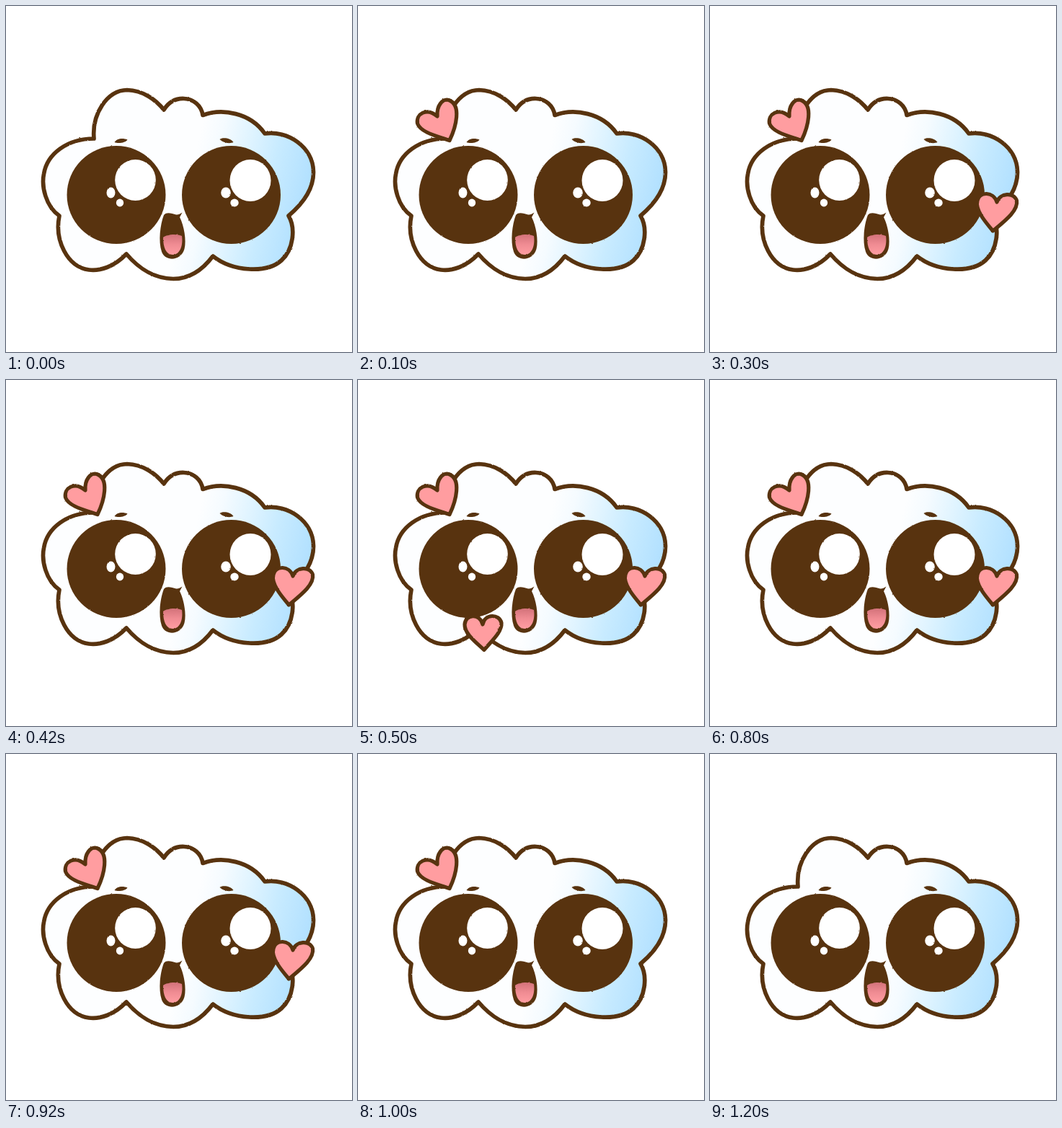
An HTML page that plays this animation: 480 px wide and 480 px high, repeating every 1300 ms.

```html
<!DOCTYPE html>
<html lang="en">
<head>
<meta charset="utf-8">
<title>Cloud with hearts</title>
<style>
  html, body { margin: 0; width: 100%; height: 100%; overflow: hidden; background: #fff; }
  svg { display: block; width: 100vw; height: 100vh; }
  .line { stroke: #58330f; stroke-width: 5.7; stroke-linejoin: round; stroke-linecap: round; }
  .ink { fill: #58330f; }
  .shine { fill: #fff; }
  .heart { fill: #ff9da0; stroke-width: 5.2; visibility: hidden; animation: 1300ms step-end infinite; }
  .one { animation-name: one; }
  .two { animation-name: two; }
  .three { animation-name: three; }
  /* Hearts pop in one by one, then leave in reverse order */
  @keyframes one {
    0%, 92.307% { visibility: hidden; }
    7.692% { visibility: visible; }
  }
  @keyframes two {
    0%, 76.923% { visibility: hidden; }
    23.076% { visibility: visible; }
  }
  @keyframes three {
    0%, 61.538% { visibility: hidden; }
    38.461% { visibility: visible; }
  }
</style>
</head>
<body>
<svg viewBox="0 0 480 480">
  <defs>
    <linearGradient id="sky" gradientUnits="userSpaceOnUse" x1="258" y1="225" x2="415" y2="262">
      <stop offset="0" stop-color="#fdfeff"/>
      <stop offset=".18" stop-color="#f5fbff"/>
      <stop offset=".42" stop-color="#e0f4ff"/>
      <stop offset=".68" stop-color="#c8ebff"/>
      <stop offset="1" stop-color="#b3e1ff"/>
    </linearGradient>
    <linearGradient id="tongue" x1="0" y1="0" x2="0" y2="1">
      <stop offset="0" stop-color="#d3727a"/>
      <stop offset=".5" stop-color="#f08c93"/>
      <stop offset="1" stop-color="#ff9da2"/>
    </linearGradient>
    <filter id="brush" filterUnits="userSpaceOnUse" x="0" y="0" width="480" height="480" color-interpolation-filters="sRGB">
      <feTurbulence type="fractalNoise" baseFrequency=".25" numOctaves="2" seed="4"/>
      <feDisplacementMap in="SourceGraphic" scale="1.8" xChannelSelector="R" yChannelSelector="G"/>
    </filter>
  </defs>

  <g filter="url(#brush)">
    <path class="line" fill="url(#sky)" d="M122 184C119 150 140 117 168 116.500C190 117 208 130 219 144
      C226 133 236 128 247 128.500C260 129 271 138 273 151.500C300 141.500 339 148 359 177
      C390 172 426 195 426.500 230C427 255 411 275 392 291C402 308 399 338 382 353
      C362 371 315 369 287 347C272 367 255 378.500 232 378.500C205 378 185 365 167 344
      C150 362 130 368 115 366C85 362 67 325 74 291C55 278 49 250 52.500 233
      C57 205 85 184 122 184Z"/>

    <g class="ink">
      <path d="M150.500 189C153 184 162 182.500 168.500 185.500C166 189.500 156 191.500 150.500 189Z"/>
      <path d="M296.500 185C300 181.500 312 183 315.500 189C310 191.500 301 190 296.500 185Z"/>
      <ellipse cx="153" cy="262" rx="68.500" ry="68"/>
      <ellipse cx="312.500" cy="262" rx="68.500" ry="68"/>
      <path d="M219 290C223 285 230 288 236 289.500C239 290 241 288.500 244.500 286.500L241 293
        C247 305 250.500 325 247.500 337C243 354 221 355 216 341C211 326 214 303 219 290Z"/>
    </g>
    <path fill="url(#tongue)" d="M218 321C224 316 238 316 244 319C246 335 240 345 231 345C222 345 218 335 218 321Z"/>

    <g class="shine">
      <ellipse cx="179.500" cy="241.500" rx="28.300" ry="28.500"/>
      <ellipse cx="339" cy="242" rx="28.500" ry="29"/>
      <ellipse cx="145.500" cy="259" rx="6" ry="7.500"/>
      <ellipse cx="158" cy="273" rx="5.200" ry="5.400"/>
      <ellipse cx="305" cy="259" rx="6.800" ry="7.600"/>
      <ellipse cx="317" cy="273" rx="5.700" ry="5.400"/>
    </g>

    <path class="line heart one" d="M127 186.500C112 181 87 176 82.500 163C80 150 95 140 110 153
      C109 138 117 128.500 126 130.500C144 137 136 168 127 186.500Z"/>
    <path class="line heart two" d="M392.500 312C384 302 367 283 371 270C374 257 393 257 398 272
      C402 259 422 258 425.500 270C428 284 408 299 392.500 312Z"/>
    <path class="line heart three" d="M175 374.500C164 364 147.500 352 148 339C149 324.500 169 323 173 339
      C176 324 196 324 199 337C200 350 184 363 175 374.500Z"/>
  </g>
</svg>
</body>
</html>
```
